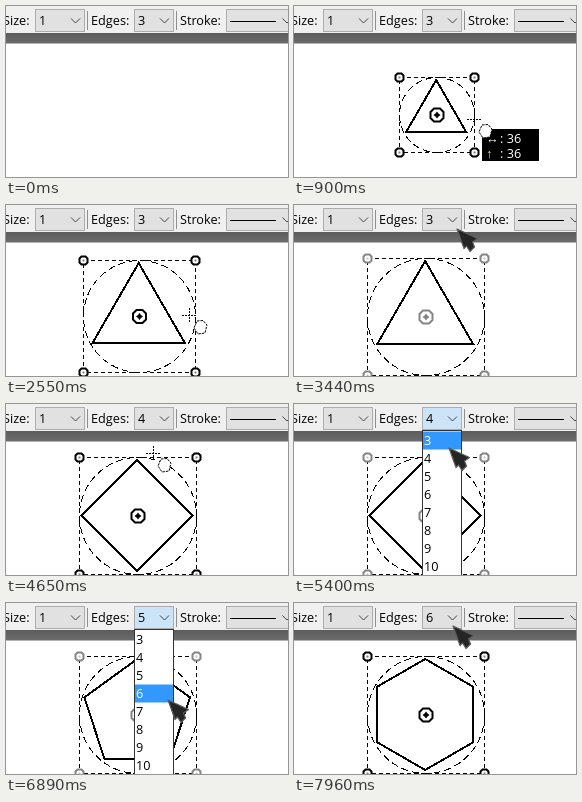
Recreate the animation shown at these times as an HTML page. Size 282 px wide and 171 px high, loop 8000 ms.

```html
<!DOCTYPE html>
<html lang="en">
<head>
<meta charset="utf-8">
<title>Polygon edges</title>
<style>
html, body { margin: 0; width: 100%; height: 100%; overflow: hidden; background: #fff; }
svg { display: block; width: 100vw; height: 100vh; }
text { font: 12.7px "Open Sans", "Noto Sans", sans-serif; fill: #000; white-space: pre; }
.box { fill: #e1e1e1; stroke: #adadad; }
.chev { fill: none; stroke: #444; }
.dash { fill: none; stroke: #000; shape-rendering: crispEdges; }
.tip text { fill: #fff; }
</style>
</head>
<body>
<svg viewBox="0 0 282 171" preserveAspectRatio="none">
  <defs>
    <linearGradient id="bar" x2="0" y2="1">
      <stop offset="0" stop-color="#5c5c5c"/><stop offset="1" stop-color="#6c6c6c"/>
    </linearGradient>
    <path id="chevron" class="chev" d="M-4.5-2 0 2.500 4.500-2"/>
    <g id="handle">
      <path d="M-2-4H2L4-2V2L2 4H-2L-4 2V-2Z" fill="#fff" stroke="currentColor" stroke-width="2"/>
      <rect x="-1" y="-1" width="2" height="2" fill="currentColor" opacity=".5"/>
    </g>
    <g id="hub">
      <path d="M-3-6.500H3L6.500-3V3L3 6.500H-3L-6.500 3V-3Z" fill="#fff" stroke="currentColor" stroke-width="2"/>
      <path d="M0-3.500 1.500-1.500 3.500 0 1.500 1.500 0 3.500-1.500 1.500-3.500 0-1.500-1.500Z" fill="currentColor"/>
    </g>
  </defs>
  <rect width="282" height="171" fill="#fff"/>

  <g id="shape">
    <rect id="frame" class="dash" stroke-dasharray="4 3"/>
    <circle id="ring" class="dash" stroke-dasharray="7 4"/>
    <path id="poly" fill="none" stroke="#000" stroke-width="2" shape-rendering="crispEdges"/>
    <g id="marks">
      <use href="#handle"/><use href="#handle"/><use href="#handle"/><use href="#handle"/>
      <use href="#hub"/>
    </g>
  </g>

  <rect width="282" height="27" fill="#f0f0f0"/>
  <rect y="27" width="282" height="10.500" fill="url(#bar)"/>
  <text x="-3" y="19">Size:</text>
  <rect class="box" x="29.500" y="3.500" width="49" height="22"/>
  <text x="33" y="19">1</text>
  <use href="#chevron" x="69.500" y="14.500"/>
  <path d="M81.500 5V24M170.500 5V24" stroke="#8f8f8f"/>
  <text x="85" y="19">Edges:</text>
  <rect id="combo" class="box" x="128.500" y="3.500" width="39" height="22"/>
  <text id="value" x="132" y="19"></text>
  <use href="#chevron" x="158.500" y="14.500"/>
  <text x="174" y="19">Stroke:</text>
  <rect class="box" x="220.500" y="3.500" width="70" height="22"/>
  <path d="M224 15.500H270" stroke="#000"/>
  <use href="#chevron" x="281" y="14.500"/>

  <g id="list"><rect x="128.500" y="26.500" width="39" height="160" fill="#fff" stroke="#333"/></g>

  <g id="tip" class="tip">
    <rect width="57" height="32"/>
    <text x="4" y="14">↔</text><text id="tipW" x="18" y="14"></text>
    <text x="4" y="29" style="fill:#ffe680">↑</text><text id="tipH" x="18" y="29"></text>
  </g>

  <g id="cross">
    <path d="M-7 .5H8M.5-7V8" stroke="#000" stroke-dasharray="2 1" shape-rendering="crispEdges"/>
    <path d="M8 6 14 5.500 18 10 16 18 9 19 5 13Z" fill="#fff" stroke="#000" stroke-dasharray="2.500 1"/>
  </g>
  <path id="arrow" d="M0 0 20.500 9.500 15.500 13 17.500 18 13 22.500 9.500 17 7 19.500Z"
        fill="#252525" stroke="#5c5c5c" stroke-width="1.2" stroke-linejoin="round"/>
</svg>
<script>
const LOOP = 8000, STEP = 150;
const $ = id => document.getElementById(id);
const set = (el, attrs) => { for (const k in attrs) el.setAttribute(k, attrs[k]); };
const show = (el, on) => { el.style.display = on ? '' : 'none'; };
const move = (el, x, y) => el.setAttribute('transform', `translate(${x} ${y})`);

// Stops of the mouse: step, x, y. One step lasts STEP ms.
const stops = [
  [1, 80, 80], [3, 105, 71], [10, 217, 133], [11, 217, 133], [16, 189, 117],
  [18, 181, 108], [20, 177, 95], [23, 163, 24], [27, 160, 18], [31, 147, 49],
  [35, 158, 20], [39, 152, 74], [40, 152, 77], [43, 160, 20], [46, 162, 97],
  [50, 162, 95], [53, 159, 23]
];
const PRESS = 3, SHIFT = 11, DROP = 16, SETTLE = 19;
// The list opens at the first step and adds an edge at the second.
const picks = [[28, 30], [35, 40], [43, 51]];

function mouse(n) {
  const i = stops.findIndex(s => s[0] >= n);
  if (i <= 0) return stops[i ? stops.length - 1 : 0].slice(1);
  const [n0, x0, y0] = stops[i - 1], [n1, x1, y1] = stops[i];
  const f = 1 - ((n1 - n) / (n1 - n0)) ** 2;
  return [x0 + (x1 - x0) * f, y0 + (y1 - y0) * f].map(Math.round);
}

// Grows from a fixed corner, then follows the mouse, then settles.
function bounds(n) {
  if (n >= SETTLE) return [73, 53, 117];
  const [x, y] = mouse(Math.min(n, DROP));
  return n < SHIFT ? [105, 71, Math.max(0, x - 105)] : [x - 112, y - 62, 112];
}

const ns = 'http://www.w3.org/2000/svg';
const rows = Array.from({ length: 8 }, (_, i) => {
  const back = document.createElementNS(ns, 'rect');
  const label = document.createElementNS(ns, 'text');
  set(back, { x: 129, y: 27.5 + i * 18, width: 38, height: 18, fill: '#3298fe' });
  set(label, { x: 130, y: 41 + i * 18 });
  label.textContent = i + 3;
  $('list').append(back, label);
  return { back, label };
});

function drawShape(n, edges) {
  const [l, t, size] = bounds(n);
  const r = size / 2, cx = l + r, cy = t + r, q = Math.max(0, r - 3);
  show($('shape'), n > PRESS);
  set($('frame'), { x: l + .5, y: t + .5, width: size, height: size });
  set($('ring'), { cx: cx + .5, cy: cy + .5, r });
  const pts = Array.from({ length: edges }, (_, i) => {
    const a = i * 2 * Math.PI / edges;
    return (cx - .3 + q * Math.sin(a)).toFixed(2) + ' ' + (cy - q * Math.cos(a)).toFixed(2);
  });
  $('poly').setAttribute('d', 'M' + pts.join('L') + 'Z');
  const marks = $('marks').children;
  for (let i = 0; i < 4; i++) move(marks[i], l + .5 + (i & 1) * size, t + .5 + (i >> 1) * size);
  move(marks[4], cx + .5, cy + .5);
  const pale = n >= SETTLE && Math.floor((n * STEP - 3420) / 400) % 2 === 0;
  $('marks').style.color = pale ? '#858585' : '#000';
  $('tipW').textContent = $('tipH').textContent = ': ' + Math.max(0, Math.floor(r) - 1);
}

function draw(ms) {
  const n = Math.floor((ms + 11) / STEP);
  const edges = 3 + picks.filter(p => n >= p[1]).length;
  const open = picks.some(p => n >= p[0] && n < p[1]);
  const fading = picks.some(p => n === p[1]);
  const [x, y] = mouse(n);
  drawShape(n, edges);

  $('value').textContent = edges;
  $('combo').style.fill = open ? '#cce4f7' : fading ? '#d5e4f0' : '#e1e1e1';

  show($('list'), open);
  const picked = y < 28 ? edges - 3 : Math.floor((y - 27.5) / 18);
  rows.forEach((row, i) => {
    show(row.back, i === picked);
    row.label.style.fill = i === picked ? '#fff' : '#000';
  });

  const pointer = open || y < 38;
  show($('arrow'), n >= 1 && pointer);
  show($('cross'), n >= 1 && !pointer);
  move($('arrow'), x, y);
  move($('cross'), x, y);
  show($('tip'), n > PRESS && n <= DROP);
  move($('tip'), x + 8, y + 10);
}

const start = performance.now();
function tick() {
  draw((performance.now() - start) % LOOP);
  requestAnimationFrame(tick);
}
draw(0);
requestAnimationFrame(tick);
</script>
</body>
</html>
```
